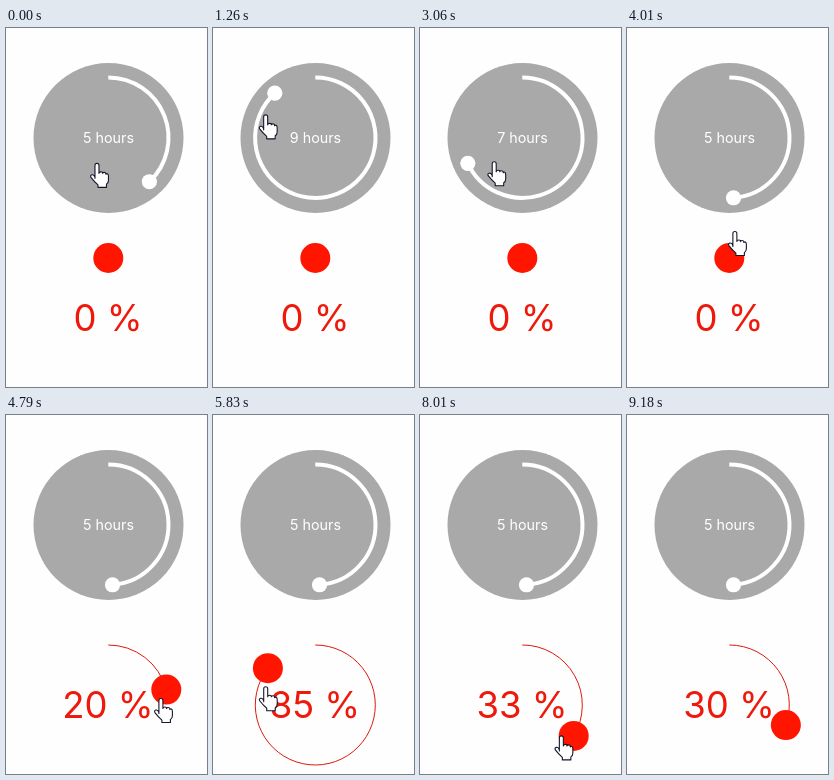
Animation, 201 px wide and 359 px high, one loop 9.97 s. Source, as an HTML page:

```html
<!DOCTYPE html>
<html lang="en">
<head>
<meta charset="utf-8">
<title>Circular sliders</title>
<style>
  html, body { margin: 0; width: 100%; height: 100%; overflow: hidden; background: #fefefe; }
  svg { display: block; width: 100%; height: 100%; }
  text { text-anchor: middle; font-family: Inter, sans-serif; }
  #hours { font-size: 14.3px; fill: #fff; }
  #percent { font-size: 36.5px; fill: #ee180b; }
</style>
</head>
<body>
<svg viewBox="0 0 201 359">
  <circle cx="102.5" cy="110" r="75" fill="#a9a9a9"/>
  <path id="hourArc" fill="none" stroke="#fff" stroke-width="4"/>
  <circle id="hourKnob" r="7.6" fill="#fff"/>
  <text id="hours" x="102.5" y="115.4"></text>
  <path id="percentArc" fill="none" stroke="#e0180b"/>
  <circle id="percentKnob" r="15" fill="#ff1500"/>
  <text id="percent" x="102" y="303"></text>
  <path id="hand" fill="#fff" stroke="#15152a" stroke-width="1.1" stroke-linejoin="round"
    d="M-2 15V2Q-2 0 0 0T2 2V10Q2 8.5 4 8.5T5.5 10Q6 9 7.5 9T9 11Q9.5 10 10.5 10.5T11.5 13V17Q11.5 20 9.5 21V24H1V21.5Q-3 18-6 14Q-7 12-5 11.5T-2 14Z"/>
</svg>
<script>
const LOOP = 9970, CX = 102.3, LEAD = 80;
const HOURS = { name: "hour", cy: 109.7, radius: 60.2 };
const PERCENT = { name: "percent", cy: 290, radius: 60 };
const REST = [109, 223];
const el = id => document.getElementById(id);

// Turning points of each drag: [ms, degrees clockwise from the top], unwrapped.
const hourDrag = [[40, 203], [960, 347], [1140, 345], [1260, 318], [2080, 50], [3060, -115], [3480, -184]];
const percentDrag = [[4390, 0], [4790, 75], [5020, 91], [5830, -52], [6400, -170],
  [7160, -19], [7410, 42], [8400, 142], [9180, 109.5]];

// Smooth interpolation that does not overshoot at turning points.
function sample(keys, t) {
  const last = keys.length - 1;
  if (t <= keys[0][0]) return keys[0][1];
  if (t >= keys[last][0]) return keys[last][1];
  const i = keys.findIndex(key => key[0] > t);
  const slope = k => (keys[k + 1][1] - keys[k][1]) / (keys[k + 1][0] - keys[k][0]);
  const tangent = k => {
    if (k === 0 || k === last) return 0;
    const a = slope(k - 1), b = slope(k);
    return a * b > 0 ? 2 * a * b / (a + b) : 0;
  };
  const [t0, v0] = keys[i - 1], [t1, v1] = keys[i];
  const d = t1 - t0, u = (t - t0) / d;
  return v0 + (v1 - v0) * u * u * (3 - 2 * u)
    + d * u * (1 - u) * ((1 - u) * tangent(i - 1) - u * tangent(i));
}

const wrap = angle => (angle % 360 + 360) % 360;

function ease(t, from, to) {
  const u = Math.min(1, Math.max(0, (t - from) / (to - from)));
  return u * u * (3 - 2 * u);
}

const mix = (a, b, u) => a.map((v, i) => v + (b[i] - v) * u);

function polar(cy, radius, degrees) {
  const a = degrees * Math.PI / 180;
  return [CX + radius * Math.sin(a), cy - radius * Math.cos(a)];
}

function drawSlider({ name, cy, radius }, angle) {
  const [x, y] = polar(cy, radius, angle);
  el(name + "Arc").setAttribute("d",
    `M${CX} ${cy - radius}A${radius} ${radius} 0 ${angle > 180 ? 1 : 0} 1 ${x} ${y}`);
  el(name + "Knob").setAttribute("cx", x);
  el(name + "Knob").setAttribute("cy", y);
}

// The pointer runs slightly ahead of the knob, at a slowly varying distance.
function handPosition(t) {
  const hourRadius = 28 + 29 * Math.sin(Math.PI * t / 3400);
  const percentRadius = 53 - 24 * Math.exp(-(((t - 7160) / 600) ** 2));
  const onHours = polar(HOURS.cy, hourRadius, sample(hourDrag, t + LEAD));
  const onPercent = polar(PERCENT.cy, percentRadius, sample(percentDrag, t + LEAD));
  return mix(mix(onHours, REST, ease(t, 3400, 4250)), onPercent, ease(t, 4300, 4550));
}

function draw(t) {
  const hourAngle = t < 40 ? 137 : wrap(sample(hourDrag, t));
  const percentAngle = wrap(sample(percentDrag, t));
  drawSlider(HOURS, hourAngle);
  drawSlider(PERCENT, percentAngle);
  el("hours").textContent = Math.floor(2 + hourAngle / 45) + " hours";
  el("percent").textContent = Math.floor(percentAngle / 3.6) + " %";
  el("hand").setAttribute("transform", `translate(${handPosition(t)})`);
  el("hand").setAttribute("visibility", t < 9180 ? "visible" : "hidden");
}

const start = performance.now();
function tick() {
  draw((performance.now() - start) % LOOP);
  requestAnimationFrame(tick);
}
tick();
</script>
</body>
</html>
```
